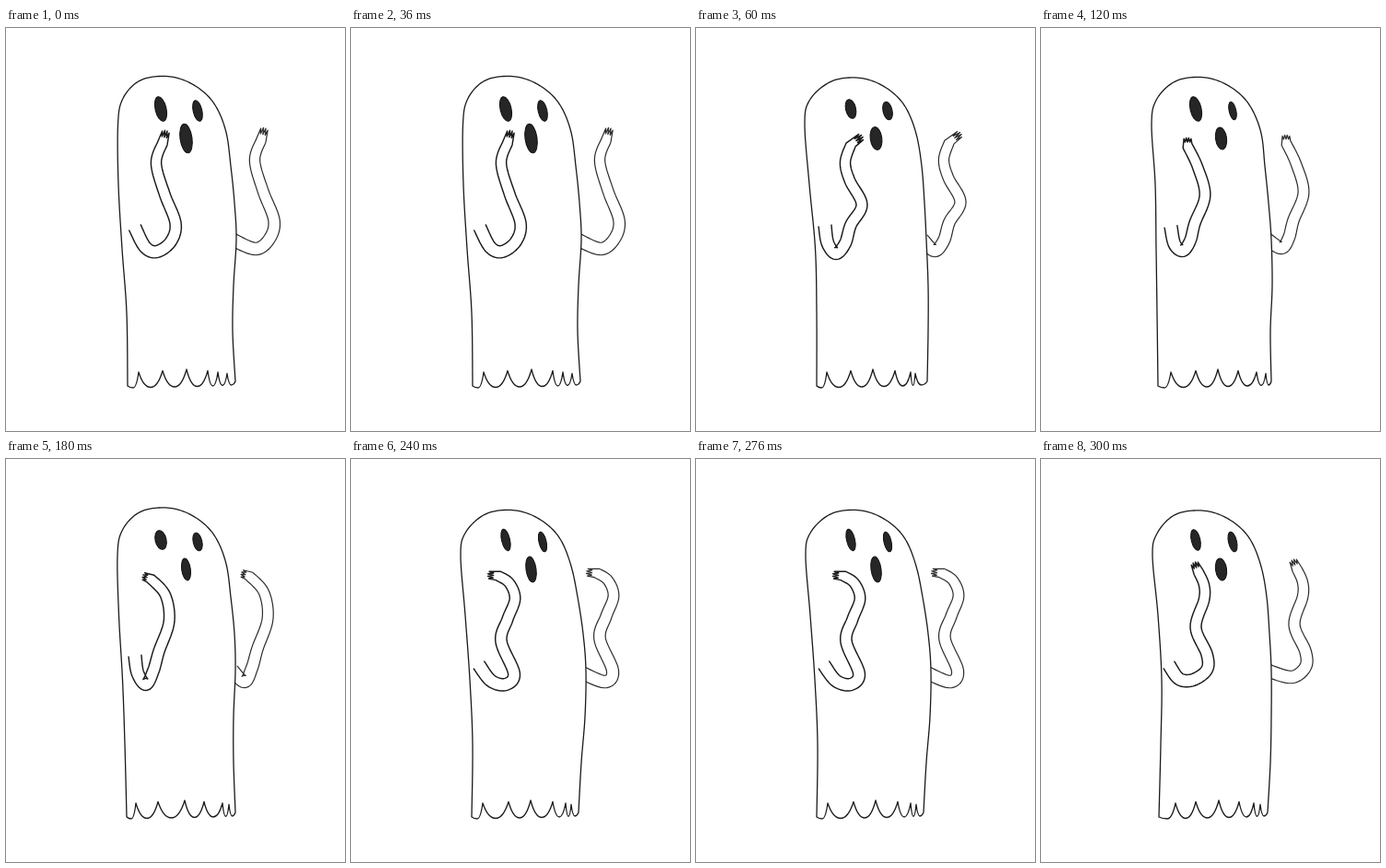
These frames come from a looping animation (368 by 438 pixels, 0.36 s). An HTML page:

```html
<!DOCTYPE html>
<html lang="en">
<head>
<meta charset="utf-8">
<title>Waving ghost</title>
<style>
  html, body { margin: 0; width: 100%; height: 100%; overflow: hidden; background: #fff; }
  svg { display: block; width: 100vw; height: 100vh; }
  path { fill: none; stroke: #1a1a1a; stroke-width: 1.3; stroke-linecap: round; stroke-linejoin: round; }
  #back { stroke: #2c2c2c; stroke-width: 1.2; }
  #body { fill: #fff; }
  #front { stroke-width: 1.45; }
  ellipse { fill: #262626; stroke: #101010; }
</style>
</head>
<body>
<svg viewBox="0 0 368 438">
  <path id="back"/>
  <path id="body"/>
  <g id="face"><ellipse/><ellipse/><ellipse/></g>
  <path id="front"/>
</svg>
<script>
const STEP = 60;

// Heights at which each pose gives the x of its sides.
const LEFT_Y = [389, 310, 240, 170, 105];
const RIGHT_Y = [150, 190, 230, 280, 330, 384];
const HEAD = [[143, 60], [166, 54], [190, 57], [212, 69], [228, 87], [239, 115]];
const FACE = [[168, 88, -13], [208, 90, -13], [195.5, 120, -8]];
const BACK_SHIFT = [107, -3];
const BACK_ROOT = [246, 230];

// arm: centre line from shoulder to wrist, then the fingertips. face: radii of eyes and mouth.
const poses = [
  {
    left: [132, 131, 126, 122, 121.5], right: [244, 248, 250, 247, 246, 249], lift: 1.5,
    peaks: [144, 170, 196, 219, 230, 240], face: [6, 13.5, 4.8, 11.5, 6.5, 16],
    arm: "140,217 151,238 164,243 179,232 184,212 172,180 163,147 170,125 174,111"
  },
  {
    left: [131, 131, 129.5, 123, 118], right: [245, 248, 250, 252, 252, 251], lift: 0,
    peaks: [142, 168, 192, 216, 233, 238], face: [5.5, 10.5, 5, 10, 6.3, 12.5],
    arm: "140,215 143,234 152,245 162,234 168,214 180,192 167,166 162,146 168,127 181,117"
  },
  {
    left: [127, 126, 125, 124, 120], right: [243, 247, 250, 251, 249, 250], lift: 0.5,
    peaks: [141, 168, 192, 214, 234, 244], face: [6, 13.5, 3.8, 10, 6, 12],
    arm: "141,216 145,235 154,242 162,231 167,212 178,182 170,151 159,128 159,119"
  },
  {
    left: [131, 129, 126.5, 122.5, 121], right: [244, 248, 249, 247, 247, 249], lift: 1,
    peaks: [141, 165, 194, 215, 235, 242], face: [6, 10.5, 4.8, 10, 4.8, 12],
    arm: "140,214 143,233 152,245 160,230 166,209 177,177 173,148 157,130 148,127"
  },
  {
    left: [131, 132, 129, 124, 119], right: [246, 252, 255, 254, 250, 247], lift: -1.5,
    peaks: [143, 171, 195, 219, 233, 239], face: [4.5, 12, 4, 11, 5.5, 14],
    arm: "139,224 152,241 168,245 177,233 163,198 170,174 178,152 172,135 160,127 148,126"
  },
  {
    left: [128, 130, 131, 127, 121], right: [245, 248, 250, 250, 249, 246], lift: -2,
    peaks: [146, 168, 193, 215, 231, 238], face: [4.8, 11.5, 4.5, 11, 6, 12],
    arm: "139,224 150,239 165,240 180,229 180,212 168,183 177,153 177,137 171,123 166,112"
  }
];

const add = (a, b, k = 1) => [a[0] + b[0] * k, a[1] + b[1] * k];
const sub = (a, b) => add(a, b, -1);
const mix = (a, b, t) => add(a, sub(b, a), t);
const normal = ([x, y]) => [-y / Math.hypot(x, y), x / Math.hypot(x, y)];
const line = pts => "M" + pts.map(p => p.map(v => v.toFixed(2))).join("L");

// Catmull-Rom samples through every key point.
function smooth(keys, steps = 10) {
  const out = [];
  for (let i = 0; i < keys.length - 1; i++) {
    const b = keys[i], c = keys[i + 1], a = keys[i - 1] || b, d = keys[i + 2] || c;
    for (let s = 0; s < steps; s++) {
      const t = s / steps;
      out.push([0, 1].map(k => b[k] + t / 2 * (c[k] - a[k]
        + t * (2 * a[k] - 5 * b[k] + 4 * c[k] - d[k])
        + t * t * (3 * b[k] - a[k] - 3 * c[k] + d[k]))));
    }
  }
  return [...out, keys[keys.length - 1]];
}

// Four fingers, zigzagging across the hand.
function fingers(wrist, tip) {
  const reach = sub(tip, wrist), across = normal(reach), pts = [];
  for (let i = 0; i < 7; i++) {
    const k = 1.5 - i / 2;
    const base = i % 2 ? mix(wrist, tip, 0.45) : add(tip, reach, -0.1 * Math.abs(k));
    pts.push(add(base, across, k * 2.6));
  }
  return pts;
}

function arm(keys) {
  const tip = keys[keys.length - 1], wrist = keys[keys.length - 2];
  const centre = smooth(keys.slice(0, -1)), last = centre.length - 1;
  const edge = side => centre.map((p, i) => {
    const along = sub(centre[Math.min(i + 1, last)], centre[Math.max(i - 1, 0)]);
    return add(p, normal(along), side * (7 - 1.6 * i / last));
  });
  return line([...edge(1), ...fingers(wrist, tip), ...edge(-1).reverse()]);
}

// Sharp peaks with round valleys halfway between them.
function hem(from, peaks, to) {
  const tops = [from, ...peaks.map((x, i) => [x, 371 + 1.5 * Math.abs(i - 2)]), to];
  let d = "";
  for (let i = 1; i < tops.length; i++) {
    const a = tops[i - 1], b = tops[i], y = 391.5 - 0.5 * i;
    const x = t => a[0] + (b[0] - a[0]) * t;
    d += `Q${x(0.2)},${y} ${x(0.5)},${y} Q${x(0.8)},${y} ${b}`;
  }
  return d;
}

function body({ left, right, lift, peaks }) {
  const leftSide = left.map((x, i) => [x, LEFT_Y[i]]);
  const rightSide = right.map((x, i) => [x, RIGHT_Y[i]]);
  const brow = [left[4] + 5, 79];
  const head = [brow, ...HEAD].map(p => sub(p, [0, lift]));
  const start = leftSide[0], end = rightSide[rightSide.length - 1];
  return line(smooth([...leftSide, ...head, ...rightSide])) + "M" + start + hem(start, peaks, end);
}

const shapes = poses.map(pose => {
  const keys = pose.arm.split(" ").map(p => p.split(",").map(Number));
  return {
    body: body(pose),
    front: arm(keys),
    back: arm([BACK_ROOT, ...keys.slice(2).map(p => add(p, BACK_SHIFT))]),
    face: pose.face
  };
});

const byId = id => document.getElementById(id);
const holes = [...byId("face").children];

function draw(time) {
  const shape = shapes[Math.floor(time / STEP) % shapes.length];
  for (const id of ["back", "body", "front"]) byId(id).setAttribute("d", shape[id]);
  holes.forEach((hole, i) => {
    const [cx, cy, tilt] = FACE[i];
    const [rx, ry] = shape.face.slice(2 * i);
    const attrs = { cx, cy, rx, ry, transform: `rotate(${tilt} ${cx} ${cy})` };
    for (const name in attrs) hole.setAttribute(name, attrs[name]);
  });
}

const start = performance.now();
function tick() {
  draw(performance.now() - start);
  requestAnimationFrame(tick);
}
tick();
</script>
</body>
</html>
```
